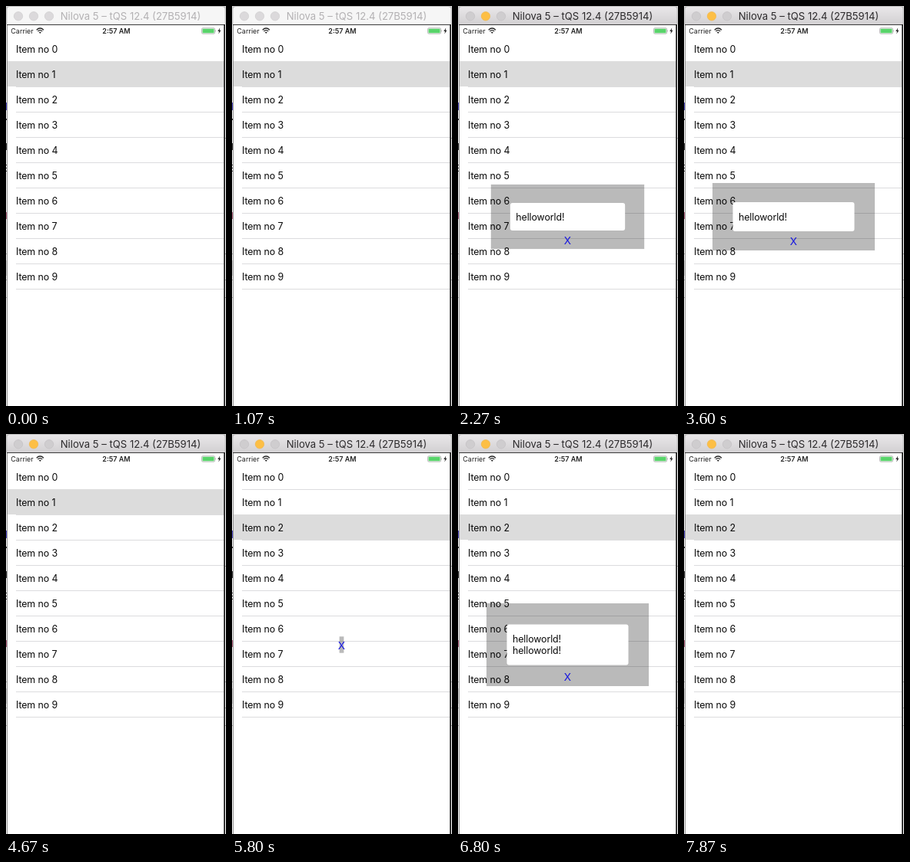
An HTML page that plays this animation: 286 by 522 pixels, repeating every 8000 ms.

```html
<!DOCTYPE html>
<html lang="en">
<head>
<meta charset="utf-8">
<title>List with popup</title>
<style>
  html, body { margin: 0; width: 100%; height: 100%; overflow: hidden; background: #fff; }
  svg { display: block; width: 286px; height: 522px; font-family: Inter, Roboto, sans-serif; }
  .body { font-size: 12.4px; letter-spacing: -.1px; fill: #0a0a0a; }
  .status { font-size: 9px; fill: #222; }
  .title { font-size: 13.1px; text-anchor: middle; fill: #b3b1b3; }
  .bar { fill: #f6f6f6; }
  .light { fill: #dbd9db; stroke: #cfcdcf; stroke-width: .7; }
  .active .title { fill: #2c2a2c; }
  .active .bar { fill: url(#barFill); }
  .active .light { fill: #cfcdcf; stroke: #c3c1c3; }
  .active .light.amber { fill: #fdbf45; stroke: #f0b64c; }
  .close { font-size: 13.6px; fill: #1414e0; text-anchor: middle; }
</style>
</head>
<body>
<svg viewBox="0 0 286 522">
  <defs>
    <linearGradient id="barFill" x2="0" y2="1">
      <stop stop-color="#e9e7e9"/><stop offset="1" stop-color="#d2d0d2"/>
    </linearGradient>
    <clipPath id="fieldClip"><rect id="clip" rx="3"/></clipPath>
  </defs>

  <!-- slivers of the windows behind -->
  <rect width="286" height="522" fill="#f4f4f4"/>
  <path d="M0 323.5H286M0 357.5H286M0 380.5H286M284 172.5H286" stroke="#a9a9a9"/>
  <rect y="332" width="2" height="20" fill="#d2d2d2"/>
  <path d="M.5 126V136" stroke="#4a45c0"/>
  <path d="M.5 147V149M.5 179V188M.5 207V208M.5 211V212M.5 215V216" stroke="#333"/>
  <path d="M.5 269V278" stroke="#b0607e"/>

  <g id="window">
    <rect width="286" height="24" fill="#c9c9c9"/>
    <path class="bar" d="M1 24V5Q1 1 5 1H281Q285 1 285 5V24Z"/>
    <path d="M1 24V5Q1 .5 5 .5H281Q285 .5 285 5V24" fill="none" stroke="#b5b5b5" stroke-width=".7"/>
    <circle class="light" cx="16" cy="13.3" r="5.7"/>
    <circle class="light amber" cx="36" cy="13.3" r="5.7"/>
    <circle class="light" cx="56" cy="13.3" r="5.7"/>
    <text class="title" x="162" y="18">Nilova 5 – tQS 12.4 (27B5914)</text>
  </g>

  <rect x="2" y="24" width="282" height="498" fill="#fff"/>
  <path d="M1.5 24V522" stroke="#8e8e8e"/>
  <path d="M1 24.5H284" stroke="#3a3a3a"/>
  <path d="M284 24V522" stroke="#111" stroke-width="1.7"/>

  <g class="status">
    <text x="6.3" y="35.7">Carrier</text>
    <text x="143.5" y="35.7" text-anchor="middle" font-weight="600">2:57 AM</text>
    <path d="M39.7 31.2Q44.3 26.8 48.9 31.2M41.4 33Q44.3 30.3 47.2 33" fill="none" stroke="#222" stroke-width="1.3"/>
    <path d="M42.8 34.3Q44.3 33 45.8 34.3L44.3 36Z"/>
    <rect x="254.5" y="28.8" width="17" height="7.4" rx="1.5" fill="#fff" stroke="#999" stroke-width=".7"/>
    <rect x="255.5" y="29.8" width="15" height="5.4" rx=".6" fill="#58d46a"/>
    <path d="M272.3 31.2Q273.5 32.5 272.3 33.8Z" fill="#777"/>
    <path d="M278.2 28.6L275.2 33H277L276.3 36.4L279.4 31.8H277.6Z"/>
  </g>

  <path id="separators" stroke="#dcdcde" stroke-width="1"/>
  <rect id="selection" x="2" width="281" height="33" fill="#dcdcdc"/>
  <g id="labels" class="body"></g>

  <g id="popup">
    <rect id="panel" fill="#000" fill-opacity=".27"/>
    <rect id="field" rx="3" fill="#fff"/>
    <g id="message" class="body" clip-path="url(#fieldClip)">
      <text id="line0">helloworld!</text>
      <text id="line1">helloworld!</text>
    </g>
    <text id="close" class="close" x="142.5">X</text>
  </g>
</svg>
<script>
const LOOP = 8000, ROW = 33, LIST_TOP = 40, CX = 142.5, CY = 275;
const ACTIVATE = 1870, SELECT_NEXT = 5800, UNMOUNT = 350;
const popups = [
  { open: 1957, shut: 4310, lines: 1, height: 88, field: 38, close: 33 },
  { open: 5790, shut: 7510, lines: 2, height: 108, field: 53, close: 42.3 }
];

const $ = id => document.getElementById(id);
const set = (id, attrs) => {
  for (const name in attrs) $(id).setAttribute(name, attrs[name]);
};
const centred = (width, height) => ({ x: CX - width / 2, y: CY - height / 2, width, height });

let labels = '', separators = '';
for (let i = 0; i < 10; i++) {
  const y = LIST_TOP + i * ROW;
  labels += `<text x="13" y="${y + 20.5}">Item no ${i}</text>`;
  separators += `M13 ${y + ROW - 0.5}H283`;
}
$('labels').innerHTML = labels;
set('separators', { d: separators });

// Underdamped spring from 0 to 1
function spring(ms) {
  const angle = ms * 0.02, decay = 0.461;
  return 1 - Math.exp(-decay * angle) * (Math.cos(angle) + decay * Math.sin(angle));
}

function openness({ open, shut }, t) {
  if (t < open || t >= shut + UNMOUNT) return 0;
  return Math.max(0, t < shut ? spring(t - open) : 1 - spring(t - shut));
}

function drawPopup(popup, p) {
  const field = centred(158 * p, popup.field * p);
  set('panel', centred(211 * p, 19 + (popup.height - 19) * p));
  set('field', field);
  set('clip', field);
  const x = field.x + 7.5, twoLines = popup.lines === 2;
  set('line0', { x, y: CY + (twoLines ? -3 : 4.5) });
  set('line1', { x, y: CY + 12, visibility: twoLines ? 'inherit' : 'hidden' });
  set('close', { y: CY + popup.close * p + 4.4 });
}

function render(t) {
  $('window').setAttribute('class', t >= ACTIVATE ? 'active' : '');
  // The selected row also covers the separator above it
  set('selection', { y: LIST_TOP + ROW * (t < SELECT_NEXT ? 1 : 2) - 1 });
  const popup = popups[t < 5400 ? 0 : 1];
  const p = openness(popup, t);
  set('popup', { visibility: p > 0 ? 'visible' : 'hidden' });
  if (p > 0) drawPopup(popup, p);
}

const start = performance.now();
function tick() {
  render((performance.now() - start) % LOOP);
  requestAnimationFrame(tick);
}
tick();
</script>
</body>
</html>
```
